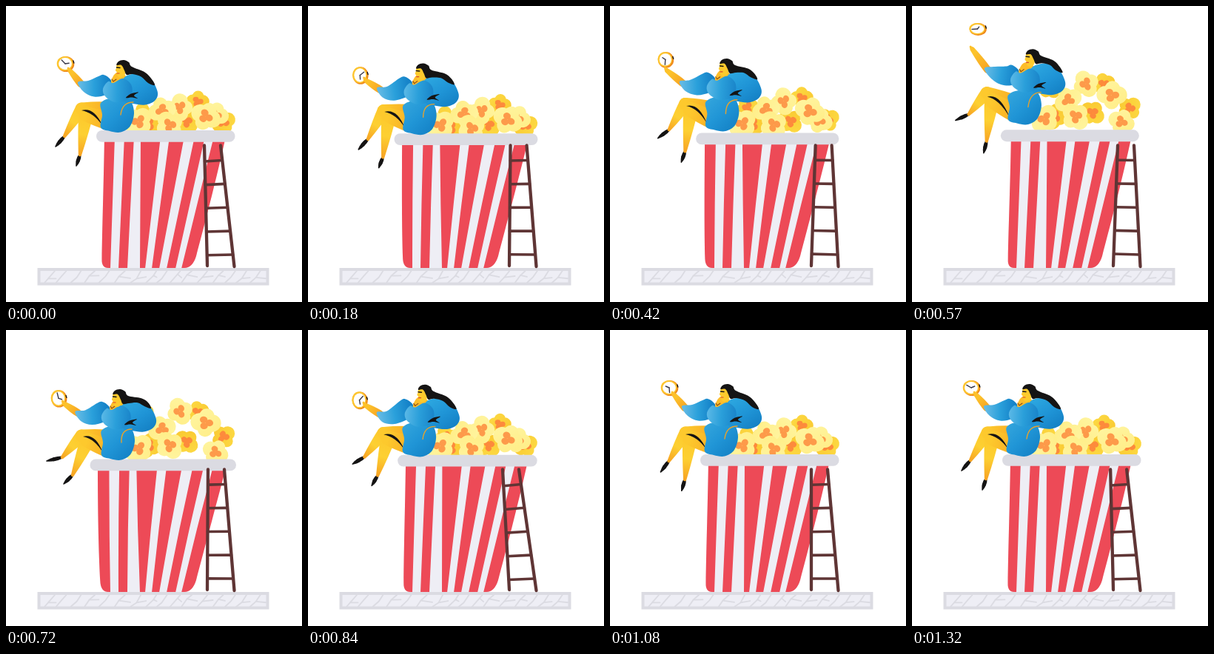
An HTML page with a canvas for the animation above (1.35 s loop, 400 px wide and 400 px high).

```html
<!DOCTYPE html>
<html>
<head>
<meta charset="utf-8">
<title>Popcorn break</title>
<style>
html, body { margin: 0; width: 100%; height: 100%; overflow: hidden; background: #fff; }
canvas { display: block; width: 400px; height: 400px; }
</style>
</head>
<body>
<canvas id="stage" width="400" height="400"></canvas>
<script>
const ctx = document.getElementById('stage').getContext('2d');
const LOOP = 1350, STEP = 30;
const RED = '#ed4a57', PALE = '#eeeef5', GREY = '#dbdbe2', WOOD = '#5f3535', BLACK = '#151414';

// All motion is driven by these few signals, keyed at shared times.
const TIMES = [0, 300, 570, 720, 840, 1080, LOOP];
const SIGNALS = {
  crouch: [0, 1, -.1, 1, .1, 0, 0],
  toss: [0, 0, 1, 0, 0, 0, 0],
  arm: [0, 1, 0, .6, .7, 0, 0],
  kick: [0, 0, 0, 1, .5, -.1, 0],
  pop: [0, 0, 1, 1.1, .1, 0, 0],
  sway: [0, 9, 10, 5, -5, 4, 0]
};

// Resting place and rise of each popcorn, back to front; the first ones are dark.
const DARK = 5;
const popcorn = [
  [259, 129, 23], [186, 147, 36], [294, 157, 18], [244, 156, 11], [193, 160, 10],
  [283, 147, -10], [235, 137, 31], [211, 141, 13], [221, 161, 11], [179, 156, 3], [270, 149, 28]
];
// Edges of the red bands along the rim and along the foot of the bucket
const bandTop = [120, 147, 160, 173, 182, 209, 221, 241, 255, 269, 281, 312];
const bandFoot = [118, 141, 152, 164, 181, 188, 197, 207, 217, 229, 237, 275];

// Smooth interpolation that never overshoots a key.
function at(keys, time) {
  const i = TIMES.findIndex((_, j) => time < TIMES[j + 1]);
  const slope = j => {
    j = (j + 6) % 6;
    return (keys[j + 1] - keys[j]) / (TIMES[j + 1] - TIMES[j]);
  };
  const tangent = j => {
    const a = slope(j - 1), b = slope(j);
    return a * b > 0 ? 2 * a * b / (a + b) : 0;
  };
  const h = TIMES[i + 1] - TIMES[i], u = (time - TIMES[i]) / h, v = 1 - u;
  return v * v * (1 + 2 * u) * keys[i] + u * u * (1 + 2 * v) * keys[i + 1]
    + h * u * v * (v * tangent(i) - u * tangent(i + 1));
}
const add = ([x, y], dx, dy) => [x + dx, y + dy];
const mix = (a, b, f) => a.map((v, i) => v + (b[i] - v) * f);
// A resting point plus weighted moves [weight, dx, dy]
const place = (x, y, ...moves) => moves.reduce((p, [w, dx, dy]) => add(p, w * dx, w * dy), [x, y]);

function shade(from, to, ...stops) {
  const g = ctx.createLinearGradient(...from, ...to);
  stops.forEach((c, i) => g.addColorStop(i / (stops.length - 1), c));
  return g;
}
function blob(points, fill) { // smooth closed curve through the points
  const n = points.length, p = i => points[(i + n) % n];
  ctx.beginPath();
  ctx.moveTo(...p(0));
  for (let i = 0; i < n; i++) {
    const [a, b, c, d] = [p(i - 1), p(i), p(i + 1), p(i + 2)];
    ctx.bezierCurveTo(b[0] + (c[0] - a[0]) / 6, b[1] + (c[1] - a[1]) / 6,
      c[0] - (d[0] - b[0]) / 6, c[1] - (d[1] - b[1]) / 6, ...c);
  }
  ctx.fillStyle = fill;
  ctx.fill();
}
function shape(offset, points, fill) {
  blob(points.map(p => add(p, ...offset)), fill);
}
function limb(a, b, ra, rb, fill) { // tapered, slightly bulging
  const angle = Math.atan2(b[1] - a[1], b[0] - a[0]);
  const side = (f, r) => add(mix(a, b, f), -Math.sin(angle) * r, Math.cos(angle) * r);
  const rm = ra * .6 + rb * .4;
  ctx.beginPath();
  ctx.moveTo(...side(0, ra));
  ctx.quadraticCurveTo(...side(.4, rm + 1), ...side(1, rb));
  ctx.arc(...b, rb, angle + Math.PI / 2, angle - Math.PI / 2, true);
  ctx.quadraticCurveTo(...side(.4, -rm - 1), ...side(0, -ra));
  ctx.arc(...a, ra, angle - Math.PI / 2, angle + Math.PI / 2, true);
  ctx.fillStyle = fill;
  ctx.fill();
}
function line(points, width, color) {
  ctx.beginPath();
  points.forEach(p => ctx.lineTo(...p));
  ctx.lineWidth = width;
  ctx.strokeStyle = color;
  ctx.stroke();
}
function disc(x, y, rx, ry, fill) {
  ctx.beginPath();
  ctx.ellipse(x, y, rx, ry, 0, 0, 7);
  ctx.fillStyle = fill;
  ctx.fill();
}

function drawGround() {
  let seed = 7;
  const random = () => (seed = seed * 16807 % 2147483647) / 2147483647;
  ctx.fillStyle = PALE;
  ctx.fillRect(43, 354, 312, 23);
  for (let x = 52; x < 338;) {
    const joint = [x + 5 + random() * 6, 362 + random() * 7], next = x + 13 + random() * 9;
    line([[x, 374], joint, [x + 14, 358]], 1.8, GREY);
    if (random() < .7) line([joint, [next, 364 + random() * 6]], 1.8, GREY);
    x = next;
  }
  ctx.lineWidth = 4;
  ctx.strokeRect(44.5, 356, 309, 19.5);
}

function drawPopcorn({ crouch, pop }) {
  popcorn.forEach(([x, y, rise], i) => {
    const r = 14.5 + i * .45, dark = i < DARK, lift = 7 * crouch - rise * pop;
    ctx.save();
    ctx.translate(x, y + lift);
    ctx.fillStyle = shade([-r, -r], [r, r], ...(dark ? ['#fddb45', '#f9c72f'] : ['#fff5a2', '#ffed85']));
    ctx.rotate(i * 1.3 + lift * .015);
    ctx.beginPath();
    for (let a = 0; a < 4; a++) {
      ctx.moveTo(0, 0);
      ctx.arc(r * .47 * Math.cos(a * 1.6), r * .47 * Math.sin(a * 1.6), r * (.62 - a % 2 * .08), 0, 7);
    }
    ctx.fill();
    for (const a of [0, 2, 4])
      disc(r * .26 * Math.cos(a), r * .26 * Math.sin(a), r * .27, r * .24, dark ? '#fd8a3c' : '#fd9a4a');
    ctx.restore();
  });
}

function drawBucket({ crouch, toss }) {
  const top = 176 + 7 * crouch, mid = (top + 354) / 2;
  ctx.save();
  ctx.beginPath();
  ctx.moveTo(133 - 9 * crouch, top);
  ctx.bezierCurveTo(132 - 8 * crouch, 240, 130 - 5 * crouch, 300, 129.5 - 2 * crouch, 342);
  ctx.quadraticCurveTo(129, 354, 138, 354);
  ctx.lineTo(241, 354);
  ctx.quadraticCurveTo(252, 354, 257, 338);
  ctx.bezierCurveTo(267, 300, 283, 240, 297 + crouch, top);
  ctx.clip();
  ctx.fillStyle = PALE;
  ctx.fillRect(110, 160, 200, 200);
  ctx.fillStyle = RED;
  for (let i = 0; i < bandTop.length; i += 2) {
    // Squashing widens the rim to the left, less so further right.
    const edge = k => {
      const x = bandTop[k] - crouch * (297 - bandTop[k]) * .05;
      return [x, (x + bandFoot[k]) / 2 - crouch, bandFoot[k]];
    };
    const [a, am, af] = edge(i), [b, bm, bf] = edge(i + 1);
    ctx.beginPath();
    ctx.moveTo(a, top);
    ctx.lineTo(b, top);
    ctx.quadraticCurveTo(bm, mid, bf, 355);
    ctx.lineTo(af, 355);
    ctx.quadraticCurveTo(am, mid, a, top);
    ctx.fill();
  }
  ctx.restore();
  const left = 122 - 8.5 * crouch - 3 * toss, right = 309.5 + 1.5 * crouch - 2.5 * toss;
  ctx.beginPath();
  ctx.roundRect(left, 168 + 6.5 * crouch, right - left, 15.8, 7.9);
  ctx.fillStyle = GREY;
  ctx.fill();
}

function drawLadder({ sway }) {
  const a = [268 + sway, 188.5], b = [290 + sway, 188.5], footA = [272, 351], footB = [308.5, 352];
  for (let i = 0; i < 5; i++) {
    const f = .122 + i * .195;
    line([mix(a, footA, f + .01 - sway * .001), mix(b, footB, f)], 3.6, WOOD);
  }
  line([a, footA], 4.3, WOOD);
  line([b, footB], 4.3, WOOD);
}

function drawWatch([x, y], rx, ry, angle) {
  disc(x + .8, y + .5, rx, ry, '#ef8a1c');
  disc(x - .5, y - .3, rx - .7, ry - .7, '#fdc52f');
  disc(x, y, rx - 2.6, ry - 2.6, '#fff');
  line([[x + rx - .6, y - 4], [x + rx + .3, y - 1]], 1.4, BLACK);
  const hand = (deg, size) => {
    const a = deg * Math.PI / 180;
    line([[x, y], [x + Math.sin(a) * (rx - 4) * size, y - Math.cos(a) * (ry - 4) * size]], 1.4, '#3a3a4a');
  };
  hand(angle, 1);
  hand(angle + 120, .7);
}

function drawLeg(hip, knee, ankle, toe, width) {
  limb(ankle, mix(ankle, toe, .55), 1.6, 2.6, BLACK);
  limb(mix(ankle, toe, .5), toe, 2.4, .8, BLACK);
  limb(knee, ankle, width, 2.2, shade(knee, ankle, '#fdc92d', '#fdd032', '#f7a423'));
  limb(hip, knee, width + 2, width, shade(hip, knee, '#f9b026', '#fdc92d'));
}

function drawWoman({ crouch, toss, arm, kick, turn }) {
  const head = place(0, 0, [crouch, -5, 7], [toss, 4, -14]);
  const torso = place(0, 0, [crouch, -2, 4], [toss, 2, -13]);
  const hips = place(0, 0, [crouch, 1, 5], [toss, 2, -10]);
  const hairTip = place(201, 107, [crouch, -5, -1], [toss, 2, -17]);
  const shoulder = add(torso, 138, 107);
  const elbow = place(100, 106, [arm, -6, 12], [toss, 1, -19]);
  const wrist = place(87, 88, [arm, -13, 20], [toss, -5, -29]);
  const watch = place(80, 78, [arm, -15, 24], [toss, 8.5, -47]);

  // Legs
  const knee1 = place(102, 139, [crouch, 0, 4], [toss, -1, -21]);
  const knee2 = place(108, 146, [crouch, 2, 3], [toss, 0, -18]);
  drawLeg(add(hips, 133, 140), knee1,
    place(79, 176, [crouch, 3, 6], [toss, -2, -29], [kick, -6, -10]),
    place(67, 190, [crouch, 2, 6], [toss, -8, -35], [kick, -14, -19]), 8.5);
  drawLeg(add(hips, 136, 155), knee2,
    place(100, 201, [crouch, 2, 5], [toss, 1, -18], [kick, -12, -10]),
    place(95, 216, [crouch, 1, 4], [toss, 2, -17], [kick, -18, -12]), 10);
  const fold = add(knee2, -6, -5);
  ctx.beginPath();
  ctx.moveTo(...fold);
  ctx.quadraticCurveTo(...add(knee2, 11, -10), ...add(hips, 130, 161));
  ctx.quadraticCurveTo(...add(knee2, 10, -2), ...fold);
  ctx.fillStyle = BLACK;
  ctx.fill();

  shape(hips, [[128, 131], [145, 124], [166, 126], [173, 143], [168, 162], [155, 170.5], [140, 169], [128, 164], [130, 147]],
    shade(add(hips, 130, 128), add(hips, 168, 166), '#32a4dc', '#2095d6', '#1482c6'));

  // Raised arm
  const forearm = add(elbow, 1, -1);
  limb(forearm, wrist, 5, 3.2, shade(wrist, forearm, '#fdc92d', '#f7a423'));
  drawWatch(watch, 11.5 - 1.5 * arm, 10.5 + 2 * arm - 2 * toss, turn);
  limb(wrist, add(wrist, -3, -4), 2.8, 1.4, '#fdc12b');
  const middle = mix(elbow, shoulder, .5);
  blob([add(elbow, -3, -3), add(elbow, 11, -5), add(shoulder, -13, -12), add(shoulder, -6, -14), add(shoulder, 3, -8),
    add(shoulder, 8, 4), add(shoulder, -3, 13), add(middle, 0, 16), add(elbow, 5, 10)],
    shade(elbow, shoulder, '#62b9e4', '#2aa0db', '#1582c8'));

  // Neck, chest and bent arm
  shape(torso, [[148, 91], [158, 91], [164, 101], [151, 109], [142, 103]], '#fdbd2a');
  shape(torso, [[158, 100], [170, 92], [184, 92], [197, 100], [205, 117], [201, 128], [188, 133.5], [172, 132], [160, 128]],
    shade(add(torso, 168, 94), add(torso, 195, 134), '#2ba5df', '#1f94d6', '#1480c4'));
  shape(torso, [[131, 112], [138, 102], [145, 104], [158, 98], [169, 106], [170, 119], [162, 128], [147, 130], [134, 122]],
    shade(add(torso, 131, 115), add(torso, 170, 118), '#5ab8e6', '#2a9fda', '#1a85ca'));
  line([add(torso, 143, 99), add(torso, 145, 102), add(torso, 149, 99)], 1.1, '#8b4a17');
  shape(torso, [[162, 124], [169, 118.5], [179, 116.5], [173, 121], [178, 125], [170, 123.5]], BLACK);
  ctx.beginPath();
  ctx.moveTo(...add(torso, 172, 130));
  ctx.quadraticCurveTo(...add(torso, 157, 130), ...add(hips, 155, 147));
  ctx.lineWidth = 1.4;
  ctx.strokeStyle = '#e5a22f';
  ctx.stroke();

  // Head
  shape(head, [[151, 77], [149, 84], [148, 87], [150, 90], [151, 95], [156, 97], [161, 92], [161, 79]], '#fdca2d');
  const lock = mix(add(head, 172, 84), hairTip, .55);
  blob([add(head, 149.5, 80), add(head, 152, 75), add(head, 159, 73), add(head, 166, 76), add(head, 170, 82),
    add(lock, 0, -7), add(hairTip, -4, -8), hairTip, add(hairTip, -9, -3), add(lock, -5, -1),
    add(head, 171, 92), add(head, 163, 93), add(head, 160, 87), add(head, 156, 80)], BLACK);
  line([add(head, 149.5, 83), add(head, 154, 83.5)], 1.4, BLACK);
  line([add(head, 150, 91), add(head, 153, 91)], 1.2, '#d8442f');
}

function draw(now) {
  const time = Math.floor(now % LOOP / STEP) * STEP;
  const pose = { turn: 720 * time / LOOP - 40 };
  for (const name in SIGNALS) pose[name] = at(SIGNALS[name], time);
  ctx.clearRect(0, 0, 400, 400);
  ctx.lineCap = 'round';
  drawPopcorn(pose);
  drawBucket(pose);
  drawGround();
  drawLadder(pose);
  drawWoman(pose);
}

let start;
function tick(now) {
  start ??= now;
  draw(now - start);
  requestAnimationFrame(tick);
}
requestAnimationFrame(tick);
</script>
</body>
</html>
```
